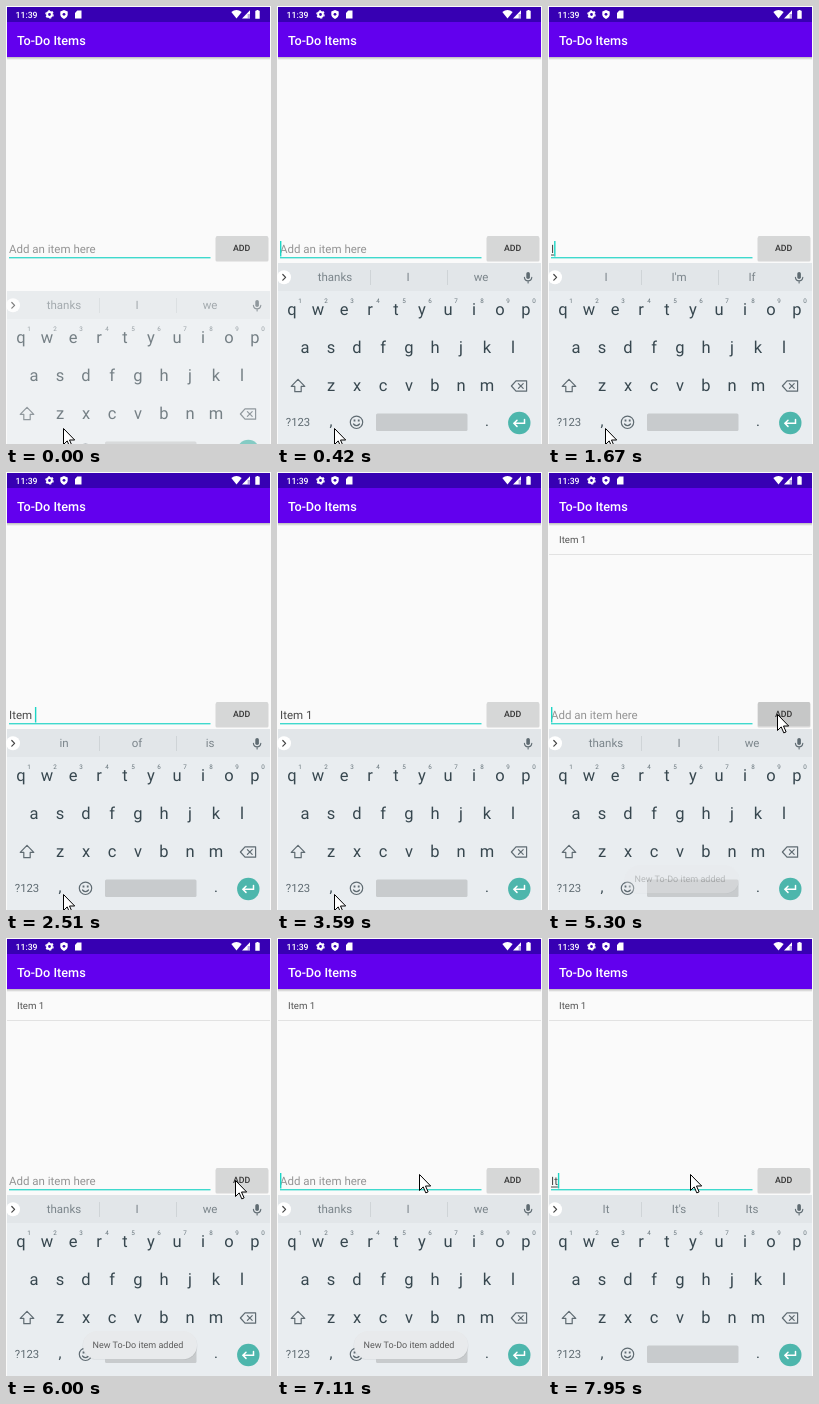
Animation, 265 px wide and 438 px high, one loop 8000 ms. Source, as an HTML page:

```html
<!DOCTYPE html>
<html lang="en">
<head>
<meta charset="utf-8">
<title>To-Do Items</title>
<style>
  html, body { margin: 0; width: 100%; height: 100%; overflow: hidden; background: #fafafa; }
  svg { display: block; width: 265px; height: 438px; font-family: Roboto, "Noto Sans", sans-serif; }
  text { text-rendering: geometricPrecision; white-space: pre; }
  .mid { text-anchor: middle; }
  .line { fill: none; stroke: #5f6b72; stroke-width: 1.2; stroke-linejoin: round; stroke-linecap: round; }
</style>
</head>
<body>
<svg viewBox="0 0 265 438">
  <defs>
    <linearGradient id="shade" x2="0" y2="1">
      <stop offset="0" stop-color="#000" stop-opacity=".26"/>
      <stop offset="1" stop-color="#000" stop-opacity="0"/>
    </linearGradient>
  </defs>
  <rect width="265" height="438" fill="#fafafa"/>

  <g id="list">
    <text x="11" y="71" font-size="9.7" fill="#555">Item 1</text>
    <rect x="1" y="82" width="263" height="1" fill="#e2e2e2"/>
  </g>

  <rect x="1" y="1" width="263" height="15" fill="#3700b3"/>
  <rect x="1" y="16" width="263" height="35" fill="#6200ee"/>
  <rect x="1" y="51" width="263" height="3" fill="url(#shade)"/>
  <text x="11" y="39" font-size="12.7" font-weight="500" fill="#fff">To-Do Items</text>
  <g fill="#fff">
    <text x="9.5" y="11.6" font-size="8.7" font-weight="500">11:39</text>
    <circle cx="43.5" cy="8.5" r="2.4" fill="none" stroke="#fff" stroke-width="2"/>
    <circle cx="43.5" cy="8.5" r="3.7" fill="none" stroke="#fff" stroke-width="1.2" stroke-dasharray="1.94"/>
    <path d="M58 4l3.7 1.5v2.8q0 3.2-3.7 4.6q-3.7-1.4-3.7-4.6v-2.8z"/>
    <circle cx="58" cy="8.3" r="1.4" fill="#3700b3"/>
    <path d="M71.3 4.5h4.2v8h-6.5v-5.6z"/>
    <path d="M225.3 6q5.2-3.8 10.4 0l-5.2 6.5z"/>
    <path d="M244 4.2v8.3h-8z"/>
    <path d="M241.6 8h2.4v4.5h-2.4z" fill="#3700b3" opacity=".35"/>
    <path d="M249.3 4.8h1.2v-.9h2v.9h1.2v7.9h-4.4z"/>
  </g>

  <text id="hint" x="3" y="247" font-size="11.5" fill="#949494">Add an item here</text>
  <text id="typed" x="3" y="247" font-size="11.5" fill="#484848"></text>
  <rect id="compose" x="3" y="248.5" height="1" fill="#484848"/>
  <rect x="3" y="251" width="201.5" height="1.4" fill="#3fd9cd"/>
  <rect id="caret" y="235" width="1.4" height="15.5" fill="#1bd5c5"/>

  <rect x="209.5" y="231" width="53" height="24.4" rx="1.5" fill="#000" opacity=".14"/>
  <rect id="button" x="210" y="230" width="52" height="24" rx="1.2"/>
  <text class="mid" x="235.7" y="245.3" font-size="8.8" font-weight="500" fill="#333">ADD</text>

  <g id="board">
    <rect x="1" y="257" width="263" height="181" fill="#e9edf0"/>
    <rect x="1" y="257" width="263" height="28" fill="#e2e6e9"/>
    <circle cx="7" cy="271.3" r="7" fill="#fff"/>
    <path class="line" style="stroke:#444" d="M5.8 268.5l2.8 2.8l-2.8 2.8"/>
    <g id="words" font-size="11.5" fill="#7b858b">
      <path d="M93.5 264v15M170.5 264v15" stroke="#cfd4d7"/>
    </g>
    <rect x="249.3" y="266" width="3.6" height="7" rx="1.8" fill="#5f6b72"/>
    <path class="line" style="stroke-width:1.1" d="M247.4 271.4q.4 3.4 3.7 3.4t3.7-3.4M251.1 275v2"/>
    <g id="keys" fill="#37474f"></g>
    <path class="line" d="M21 373.3l6.8 7h-3.6v5.4h-6.4v-5.4h-3.6z"/>
    <path class="line" d="M239 374.8h10.6v10.4h-10.6l-4.6-5.2zM241.4 377.6l4.8 4.8M246.2 377.6l-4.8 4.8"/>
    <text class="mid" x="21" y="420.3" font-size="11.3" fill="#5f6b72">?123</text>
    <circle class="line" cx="79.5" cy="416.3" r="6.2"/>
    <path class="line" d="M76.5 418q3 3.4 6 0"/>
    <path d="M76.6 413.6h1.8v1.8h-1.8zM80.8 413.6h1.8v1.8h-1.8z" fill="#5f6b72"/>
    <rect x="99" y="407.5" width="91.5" height="17.5" rx="1.5" fill="#c8cbcd"/>
    <circle cx="242.3" cy="417" r="11.2" fill="#4db6ac"/>
    <path class="line" style="stroke:#fff;stroke-width:1.5;stroke-linejoin:miter" d="M247.5 413.5v3.8h-10.3M240 414.2l-3.1 3.1l3.1 3.1"/>
  </g>

  <g id="toast">
    <rect x="76.5" y="394" width="115" height="28" rx="14" fill="#000" opacity=".06"/>
    <rect x="77" y="393" width="114" height="28.3" rx="14" fill="#e8eaec"/>
    <text class="mid" x="132" y="410.3" font-size="9" fill="#5c5c5c">New To-Do item added</text>
  </g>

  <path id="mouse" d="M.5 .5v16l3.7-3.6l2.6 6l2.3-1l-2.6-5.9h5.2z" fill="#fff" stroke="#000" stroke-linejoin="miter"/>
</svg>
<script>
const LOOP = 8000;
const $ = id => document.getElementById(id);
const pen = document.createElement('canvas').getContext('2d');

function addText(parent, x, y, size, str) {
  const el = document.createElementNS('http://www.w3.org/2000/svg', 'text');
  el.setAttribute('class', 'mid');
  el.setAttribute('x', x);
  el.setAttribute('y', y);
  if (size) el.setAttribute('font-size', size);
  el.textContent = str;
  return parent.appendChild(el);
}

// Keyboard rows: letters, first key centre, baseline
[['qwertyuiop', 15, 309], ['asdfghjkl', 28, 347], ['zxcvbnm', 54, 385]].forEach(([row, x, y], r) =>
  [...row].forEach((ch, i) => {
    addText($('keys'), x + i * 26, y, 16.5, ch);
    if (r === 0) addText($('keys'), x + i * 26 + 8, 297, 6.3, (i + 1) % 10).setAttribute('fill', '#66737a');
  }));
addText($('keys'), 54, 420, 15, ',');
addText($('keys'), 210, 420, 15, '.');
const slots = [58, 131, 204].map(x => addText($('words'), x, 275.3, 0, ''));

// Each step changes only the listed parts of the state
const START = {
  up: 0, caret: 0, typed: '', compose: 0, words: 'thanks,I,we',
  item: 0, toast: 0, press: 0
};
const STEPS = [
  [150, { up: 1 }],
  [420, { caret: 1 }],
  [700, { typed: 'I', compose: 1, words: "I,I'm,If" }],
  [1130, { caret: 0 }],
  [1670, { caret: 1 }],
  [2100, { caret: 0 }],
  [2380, { caret: 1, typed: 'Ite', words: 'Ite,Item,Items' }],
  [2510, { typed: 'Item ', compose: 0, words: 'in,of,is' }],
  [2920, { caret: 0 }],
  [3060, { caret: 1, typed: 'Item 1', words: '' }],
  [3590, { caret: 0 }],
  [4130, { caret: 1 }],
  [4570, { caret: 0 }],
  [5000, { caret: 1, press: 1 }],
  [5140, { typed: '', words: 'thanks,I,we', item: 1 }],
  [5280, { toast: .35 }],
  [5420, { toast: .75, press: 0 }],
  [5560, { toast: 1 }],
  [5640, { caret: 0 }],
  [6410, { caret: 1 }],
  [6980, { caret: 0 }],
  [7110, { caret: 1 }],
  [7400, { toast: .65 }],
  [7520, { toast: .25 }],
  [7640, { toast: 0, typed: 'I', compose: 1, words: "I,I'm,If" }],
  [7950, { typed: 'It', words: "It,It's,Its" }]
];

// Pointer glides: start, end, number of held positions, from, to
const GLIDES = [
  [3590, 4570, 7, [57, 422], [229, 242]],
  [6000, 6680, 5, [229, 242], [142, 236]]
];

function pointer(t) {
  let at = GLIDES[0][3];
  for (const [a, b, n, from, to] of GLIDES) {
    if (t < a) break;
    const p = Math.min(1, Math.floor((t - a) / (b - a) * n + 1e-6) / n);
    const e = p * p * (3 - 2 * p);
    at = from.map((v, i) => Math.round(v + (to[i] - v) * e));
  }
  return at;
}

function draw(t) {
  const s = Object.assign({}, START);
  for (const [at, change] of STEPS) if (t >= at) Object.assign(s, change);

  pen.font = '11.5px Roboto, "Noto Sans", sans-serif';
  const width = pen.measureText(s.typed).width;
  $('hint').style.opacity = s.typed ? 0 : 1;
  $('typed').textContent = s.typed;
  $('compose').setAttribute('width', s.compose ? width : 0);
  $('caret').setAttribute('x', 3 + width);
  $('caret').style.opacity = s.caret;
  $('button').setAttribute('fill', s.press ? '#c6c7c7' : '#d6d7d7');
  $('list').style.opacity = s.item;
  $('toast').style.opacity = s.toast;

  $('board').setAttribute('transform', `translate(0 ${s.up ? 0 : 28})`);
  $('board').style.opacity = s.up ? 1 : .68;
  const words = s.words.split(',');
  $('words').style.opacity = s.words ? 1 : 0;
  slots.forEach((el, i) => el.textContent = words[i] || '');

  $('mouse').setAttribute('transform', `translate(${pointer(t)})`);
}

const began = performance.now();
function tick() {
  draw((performance.now() - began) % LOOP);
  requestAnimationFrame(tick);
}
tick();
</script>
</body>
</html>
```
